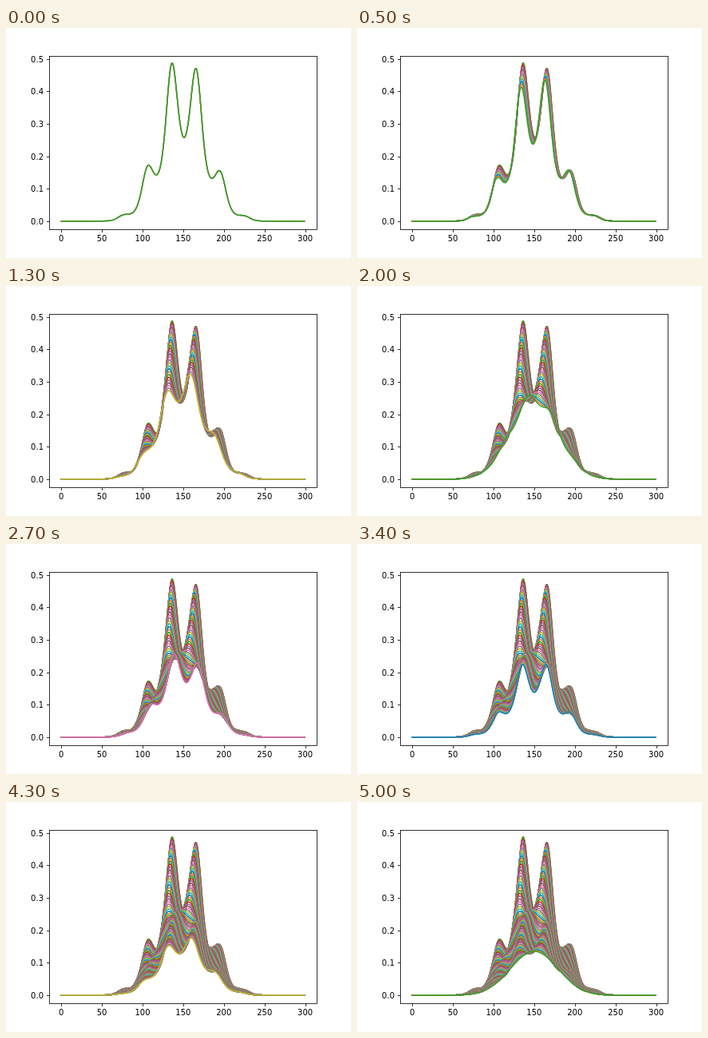
These frames come from a looping animation (432 by 288 pixels, 5.05 s). An HTML page:

```html
<!DOCTYPE html>
<html lang="en">
<head>
<meta charset="utf-8">
<title>Accumulating curves</title>
<style>
  html, body { margin: 0; width: 100%; height: 100%; overflow: hidden; background: #fff; }
  svg { display: block; width: 100vw; height: 100vh; }
  text { font: 10px "DejaVu Sans", sans-serif; fill: #000; }
  .axis { fill: none; stroke: #000; stroke-width: .8; }
  .curve { fill: none; stroke-width: 1.5; stroke-linejoin: round; stroke-linecap: square; }
</style>
</head>
<body>
<svg id="plot" viewBox="0 0 432 288"></svg>
<script>
const STEP = 50, COUNT = 101, SAMPLES = 300;
const COLORS = ['#1f77b4', '#ff7f0e', '#2ca02c', '#d62728', '#9467bd',
                '#8c564b', '#e377c2', '#7f7f7f', '#bcbd22', '#17becf'];
const svg = document.getElementById('plot');

const px = x => 69.22 + x * 1.01794;
const py = y => 242.12 - y * 406.8;
const snap = v => Math.floor(v + .5) + .5;

function add(tag, attrs, text) {
  const el = document.createElementNS('http://www.w3.org/2000/svg', tag);
  for (const k in attrs) el.setAttribute(k, attrs[k]);
  if (text !== undefined) el.textContent = text;
  svg.appendChild(el);
  return el;
}

// Decaying bell, rippled by the beat of a fixed and a travelling wave.
function value(x, n) {
  const d = x - 150;
  const phase = Math.PI * (n - 4) / 64;
  const ripple = .385 * Math.exp(-n / 300) * Math.cos(phase);
  const bell = .376 * 2 ** (-n / 68) * Math.exp(-d * d / (2 * 29.2 ** 2));
  return bell * Math.exp(-ripple * Math.cos(d / 5 + phase));
}

function curve(n, color) {
  let d = '';
  for (let x = 0; x < SAMPLES; x++) {
    d += (x ? 'L' : 'M') + px(x).toFixed(2) + ' ' + py(value(x, n)).toFixed(2);
  }
  return add('path', { class: 'curve', d, stroke: COLORS[color % 10] });
}

function drawAxes() {
  for (let x = 0; x <= 300; x += 50) {
    add('path', { class: 'axis', d: `M${snap(px(x))} 252.5v3.5` });
    add('text', { x: px(x), y: 267, 'text-anchor': 'middle' }, x);
  }
  for (let i = 0; i <= 5; i++) {
    const y = py(i / 10);
    add('path', { class: 'axis', d: `M54.5 ${snap(y)}h-3.5` });
    add('text', { x: 47, y: y + 3.8, 'text-anchor': 'end' }, (i / 10).toFixed(1));
  }
  add('rect', { class: 'axis', x: 54.5, y: 35.5, width: 335, height: 217 });
}

// The first curve is laid down three times, using up the first colours.
curve(0, 0);
curve(0, 1);
const curves = Array.from({ length: COUNT }, (_, n) => curve(n, n + 2));
drawAxes();

let shown = -1;
function render(ms) {
  const last = Math.floor(ms / STEP) % COUNT;
  if (last === shown) return;
  shown = last;
  curves.forEach((c, n) => c.style.display = n <= last ? '' : 'none');
}

const start = performance.now();
function tick() {
  render(performance.now() - start);
  requestAnimationFrame(tick);
}
tick();
</script>
</body>
</html>
```
